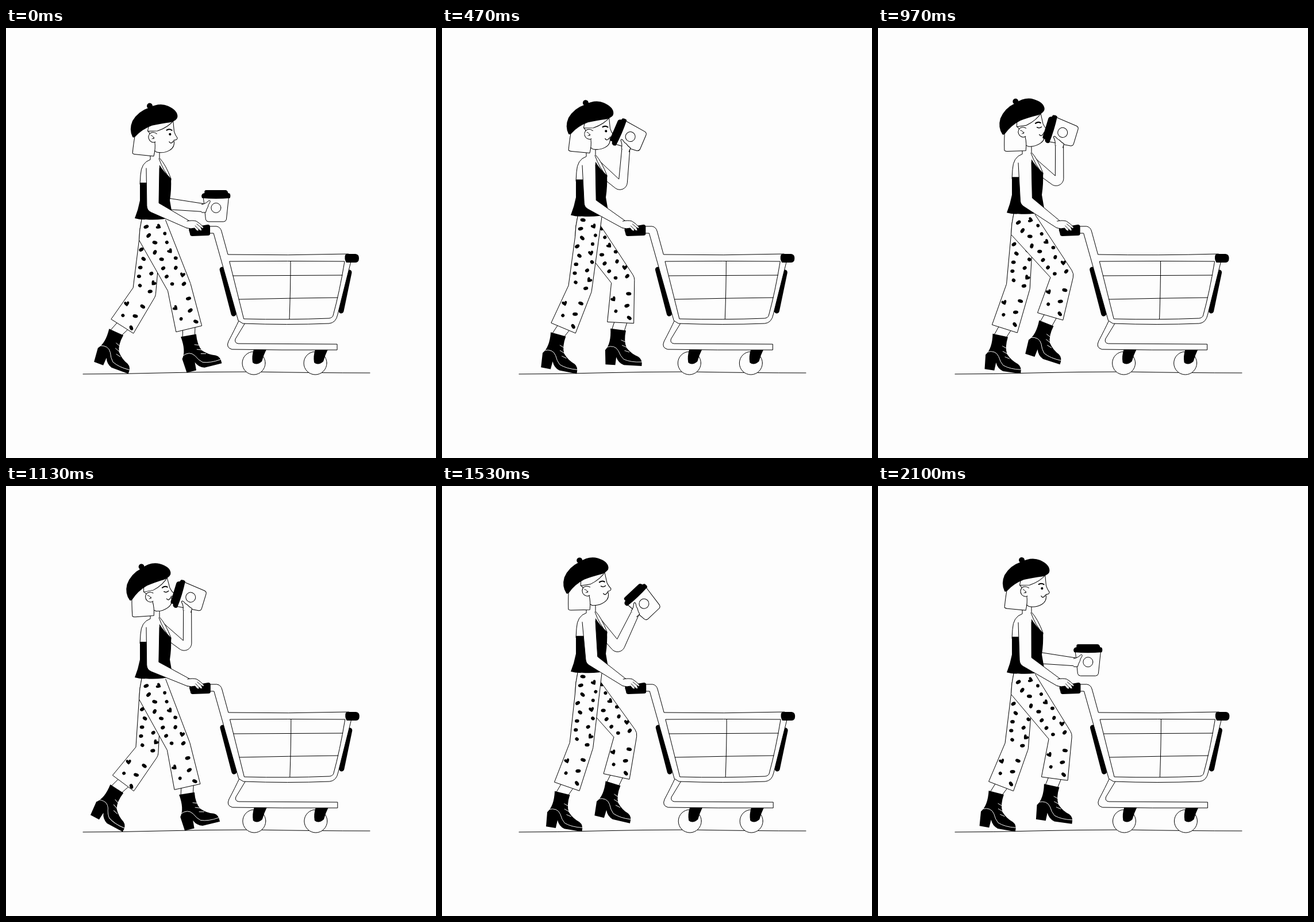
Write an HTML page with a canvas that moves like this. It is 748 by 748 pixels and loops after 2130 ms.

```html
<!DOCTYPE html>
<html lang="en">
<head>
<meta charset="utf-8">
<title>Shopping walk</title>
<style>
html, body { margin: 0; width: 100%; height: 100%; overflow: hidden; background: #fdfdfd; }
canvas { display: block; }
</style>
</head>
<body>
<canvas id="stage" width="748" height="748"></canvas>
<script>
const ctx = document.getElementById('stage').getContext('2d');
const PAPER = '#fdfdfd', INK = '#000';
const LOOP = 2130, STEP = 100 / 3, CYCLE = 1100;
const RAD = Math.PI / 180;
const THIGH = 115, SHIN = 74, GROUND = 600;

const clamp = v => Math.max(0, Math.min(1, v));
const ramp = (t, a, b) => { const u = clamp((t - a) / (b - a)); return u * u * (3 - 2 * u); };

// Closed smooth curve through evenly spaced key values; phase runs 0..1
function cyclic(...v) {
  const n = v.length, at = i => v[(i + n) % n];
  return phase => {
    const x = (phase - Math.floor(phase)) * n, i = Math.floor(x), u = x - i;
    const a = at(i), b = at(i + 1);
    const m = (b - at(i - 1)) / 2, k = (at(i + 2) - a) / 2;
    return a + u * (m + u * (3 * (b - a) - 2 * m - k + u * (2 * (a - b) + m + k)));
  };
}

const thighAngle = cyclic(23, 22, 4, -6, -7.8, 7, 26, 34);
const shinAngle = cyclic(13.5, -5, -10, -18, -31, -41, -43, -17);
const footAngle = cyclic(-14, 0, 1, 8, 20, 59, 58, 19);
const bob = cyclic(0, 4, -1.5, -9, -13, -6);

const lift = t => ramp(t, 0, 540) - ramp(t, 1370, 1855);
const nod = t => 2 - 11 * (ramp(t, 420, 1330) - ramp(t, 1380, 1770));

const svg = d => new Path2D(d);

function shape(path, fill, stroke, width = 1) {
  if (fill) { ctx.fillStyle = fill; ctx.fill(path); }
  if (stroke) { ctx.strokeStyle = stroke; ctx.lineWidth = width; ctx.stroke(path); }
}
const line = (d, color = INK, width) => shape(svg(d), null, color, width);
const blob = (d, fill = INK) => shape(svg(d), fill, fill === INK ? null : INK);

function disc(x, y, r, fill, stroke) {
  const p = new Path2D();
  p.arc(x, y, r, 0, 7);
  shape(p, fill, stroke);
}

function placed(x, y, deg, draw) {
  ctx.save();
  ctx.translate(x, y);
  ctx.rotate(deg * RAD);
  draw();
  ctx.restore();
}

// Directions are measured from straight down, positive to the right
const down = deg => [Math.sin(deg * RAD), Math.cos(deg * RAD)];
const unit = (x, y) => { const l = Math.hypot(x, y); return [x / l, y / l]; };
const side = d => [d[1], -d[0]];
const move = (p, n, k) => [p[0] + n[0] * k, p[1] + n[1] * k];
const mid = (a, b) => unit(a[0] + b[0], a[1] + b[1]);

const HEART = svg('M0 5Q-5 1-4.5-2Q-2-5 0-1.5Q2-5 4.5-2Q5 1 0 5Z');

// Two staggered columns of spots running down a limb
function spots(o, d, count, first, gap, sign) {
  const n = side(d);
  ctx.save();
  ctx.transform(n[0], n[1], d[0], d[1], o[0], o[1]);
  for (let i = 0; i < count; i++) {
    const wave = Math.sin(i * 5);
    placed(sign * (i % 2 ? -1 : 1) * 11.5 + 3.5 * wave, first + gap * i, 40 * wave, () => {
      let p = HEART;
      if (i % 6 !== 1) {
        p = new Path2D();
        p.ellipse(0, 0, 3.7 + .9 * Math.cos(i * 3), 3, 0, 0, 7);
      }
      shape(p, INK);
    });
  }
  ctx.restore();
}

function boot() {
  blob('M-13-4L14-2Q11 17 17 28Q26 38 38 42Q46 46 45 58L14 58Q4 55 0 45L-1 59L-18 59L-20 34Q-10 22-13-4Z');
  line('M-18 29Q-4 23 3 34Q7 43 13 48Q26 53 44 51', PAPER, .9);
  line('M7 15L15 18M9 24L17 27M14 33L22 35', PAPER, .9);
}

function leg(phase, dy, far) {
  const q = phase % 1, r = footAngle(q);
  const hip = [256, 345 + dy], t = down(thighAngle(q));
  const knee = move(hip, t, THIGH);
  let s = down(shinAngle(q));
  let hem = move(knee, s, SHIN);

  // keep the sole on the ground while the foot carries weight
  const foot = down(r), sole = Math.max(59 * foot[1] - 20 * foot[0], 57 * foot[1] + 43 * foot[0]);
  const gap = GROUND - (hem[1] + s[1] * 15 + sole);
  hem[1] += gap * clamp((.7 - q) / .1);
  s = unit(hem[0] - knee[0], hem[1] - knee[1]);

  const top = move(hem, s, 15);
  top[0] -= 4;
  const nt = side(t), ns = side(s), nk = mid(nt, ns);
  const nb = [foot[1], foot[0]];

  const ankle = new Path2D();
  ankle.moveTo(...move(hem, ns, -11));
  ankle.lineTo(...move(top, nb, -11));
  ankle.lineTo(...move(top, nb, 11));
  ankle.lineTo(...move(hem, ns, 11));
  shape(ankle, PAPER, INK);
  placed(...top, r, boot);

  const front = far ? [271, 342 + dy] : [278 - 5 * clamp((knee[0] - 299) / 20), 334 + dy];
  const p = new Path2D();
  p.moveTo(236, 333 + dy);
  p.quadraticCurveTo(232, 350 + dy, 231.5, 369 + dy);
  p.lineTo(...move(knee, nk, -20.5));
  p.lineTo(...move(hem, ns, -23));
  p.lineTo(...move(hem, ns, 23));
  p.arcTo(...move(knee, nk, 21), ...front, 16);
  p.lineTo(...front);
  shape(p, PAPER, INK);
  ctx.save();
  ctx.clip(p);
  spots(hip, t, 16, -4, 7.8, -1);
  spots(knee, s, 5, 23, 10.5, 1);
  ctx.restore();
}

// Bent limb outline: a = shoulder, b = elbow, c = wrist, with half widths
function arm(a, b, c, wa, wb, wc) {
  const nu = side(unit(b[0] - a[0], b[1] - a[1]));
  const nf = side(unit(c[0] - b[0], c[1] - b[1]));
  const nb = mid(nu, nf);
  const k = wb / Math.max(.6, nb[0] * nu[0] + nb[1] * nu[1]);
  const low = move(c, nf, -wc);
  const p = new Path2D();
  p.moveTo(...move(a, nu, -wa));
  p.arcTo(...move(b, nb, -k), ...low, 13);
  p.lineTo(...low);
  p.lineTo(...move(c, nf, wc));
  p.lineTo(...move(b, nb, k));
  p.lineTo(...move(a, nu, wa));
  shape(p, PAPER, INK);
}

function torso() {
  blob('M251 212L251 229Q235 234 234 256L233 272L286 272L287 262Q278 238 267 226L267 210', PAPER);
  blob('M233 269L233 300Q230 316 224 331Q235 334 243 333Q268 335 290 329L285 300Q288 280 287 262Q274 250 267 238L266 269Z');
  line('M266 227Q274 250 287 263');
}

function head(shut) {
  blob('M288 156L291 179Q293 185 297 190Q297 194 291 194Q294 206 284 212Q274 218 262 216L256 212L246 180L250 160Z', PAPER);
  blob('M225 176Q221 200 220 219Q221 221 225 221L257 223Q260 210 258 198L246 180L262 168Z', PAPER);
  blob('M247 166L245 180L262 179Q281 172 291 158L280 152Z', PAPER);
  blob('M261 184Q256 180 250 183Q244 189 249 196Q254 201 259 198', PAPER);
  line('M251 187Q256 188 256 193M253 193L257 191', INK, .9);
  blob('M219 191Q212 178 218 163Q227 146 246 139Q264 129 279 135Q296 142 296 153Q296 159 285 163Q266 166 252 170Q235 177 224 190Q221 193 219 191Z');
  disc(247, 136, 5, INK);
  line('M278 177Q283 174 287 177', INK, 2);
  if (shut) line('M280 184Q284 187 288 184', INK, 1.4);
  else disc(284, 184, 2.1, INK);
  line('M283 197Q286 202 290 196', INK, 1.2);
}

function cup() {
  blob('M-22-18L-18 20Q-17 24-13 24L13 24Q17 24 18 20L22-18Z', PAPER);
  blob('M-23-25L-20-26Q-21-31-17-31L16-31Q20-31 21-26L24-25Q26-21 24-17Q0-15-24-17Q-27-22-23-25Z');
  disc(0, 0, 8.5, PAPER, INK);
  blob('M-25-6Q-20-7-17-9L-12-13Q-9-13-11-9Q-14-5-14-2Q-17 3-18 8L-25 8', PAPER);
}

function wheel() {
  disc(0, 0, 20, PAPER, INK);
  blob('M0-24L22-24Q17-14 14-3Q5 5-2-1Q-4-12 0-24Z');
}

function cart() {
  placed(431, 583, 0, wheel);
  placed(538, 583, 0, wheel);
  line('M376 420L396 497', INK, 9);
  line('M597 425L583 492', INK, 9);
  // lower frame
  blob('M405 509Q398 524 387 545Q382 556 393 559L480 560L576 560L576 550L404 549Q397 548 399 541L416 513Z', PAPER);
  // handle, posts and basket rim
  blob('M352 345L366 345Q373 346 375 354L386 394Q490 396 596 393L600 406L577 498Q574 513 562 514Q490 517 412 514L404 509L361 357L352 357Z', PAPER);
  blob('M389 406Q490 405 589 406Q580 460 569 500Q568 504 562 505Q490 508 414 506Z', PAPER);
  line('M395 431L585 430M405 472Q490 470 577 469M495 406Q495 450 493 506');
  blob('M322 347L351 342Q355 342 355 346L355 358Q355 361 351 361L324 362Q320 362 320 358L318 351Q318 348 322 347Z');
  blob('M592 393L608 393Q614 394 614 400Q614 408 608 408L592 408Q588 402 590 395Z');
}

function nearArm(dy, cx) {
  const a = [255.5, 244 + dy], c = [318 + cx, 342.5];
  const upper = 67, lower = 70;
  const x = c[0] - a[0], y = c[1] - a[1];
  const d = Math.min(Math.hypot(x, y), upper + lower - .5);
  const bend = Math.acos((upper * upper + d * d - lower * lower) / (2 * upper * d));
  const turn = Math.atan2(y, x) + bend;
  const b = move(a, [Math.cos(turn), Math.sin(turn)], upper);
  arm(a, b, c, 11.5, 10.5, 6.5);
  placed(cx, 0, 0, () => {
    blob('M315 336Q324 334 331 336Q338 340 344 347Q342 350 339 347L341 352Q338 354 335 350L335 353Q332 354 328 348Q322 350 315 348', PAPER);
    line('M332 341L339 347M329 344L335 350', INK, .9);
  });
}

function draw(time) {
  const p = time / CYCLE;
  const dy = bob(p * 2), raised = lift(time);
  const cx = 4.6 * Math.cos(2 * Math.PI * (p - .2)) - 1.4;

  ctx.fillStyle = PAPER;
  ctx.fillRect(0, 0, 748, 748);
  ctx.lineJoin = ctx.lineCap = 'round';
  line('M134 602Q200 602 270 600Q350 598 430 598Q540 600 633 600');

  leg(p + .5, dy, true);
  leg(p, dy, false);

  const shoulder = [266, 243 + dy], fore = down(84 + 96 * raised);
  const elbow = move(shoulder, down(8 + 44 * raised), 63);
  const wrist = move(elbow, fore, 72);
  const turn = -73 * Math.pow(raised, 1.7);
  arm(shoulder, elbow, move(wrist, fore, -4), 10, 10, 7);

  placed(0, dy, 0, torso);
  placed(260, 222 + dy, nod(time), () => {
    ctx.translate(-260, -222);
    head(time > 780 && time < 1560);
  });
  placed(...wrist, turn, () => {
    ctx.translate(19, 0);
    cup();
  });
  placed(cx, 0, 0, cart);
  nearArm(dy, cx);
}

const start = performance.now();
function tick() {
  const t = (performance.now() - start) % LOOP;
  const step = Math.floor((Math.floor(t / 10) * 10 + 5) / STEP);
  draw(step * STEP);
  requestAnimationFrame(tick);
}
tick();
</script>
</body>
</html>
```
